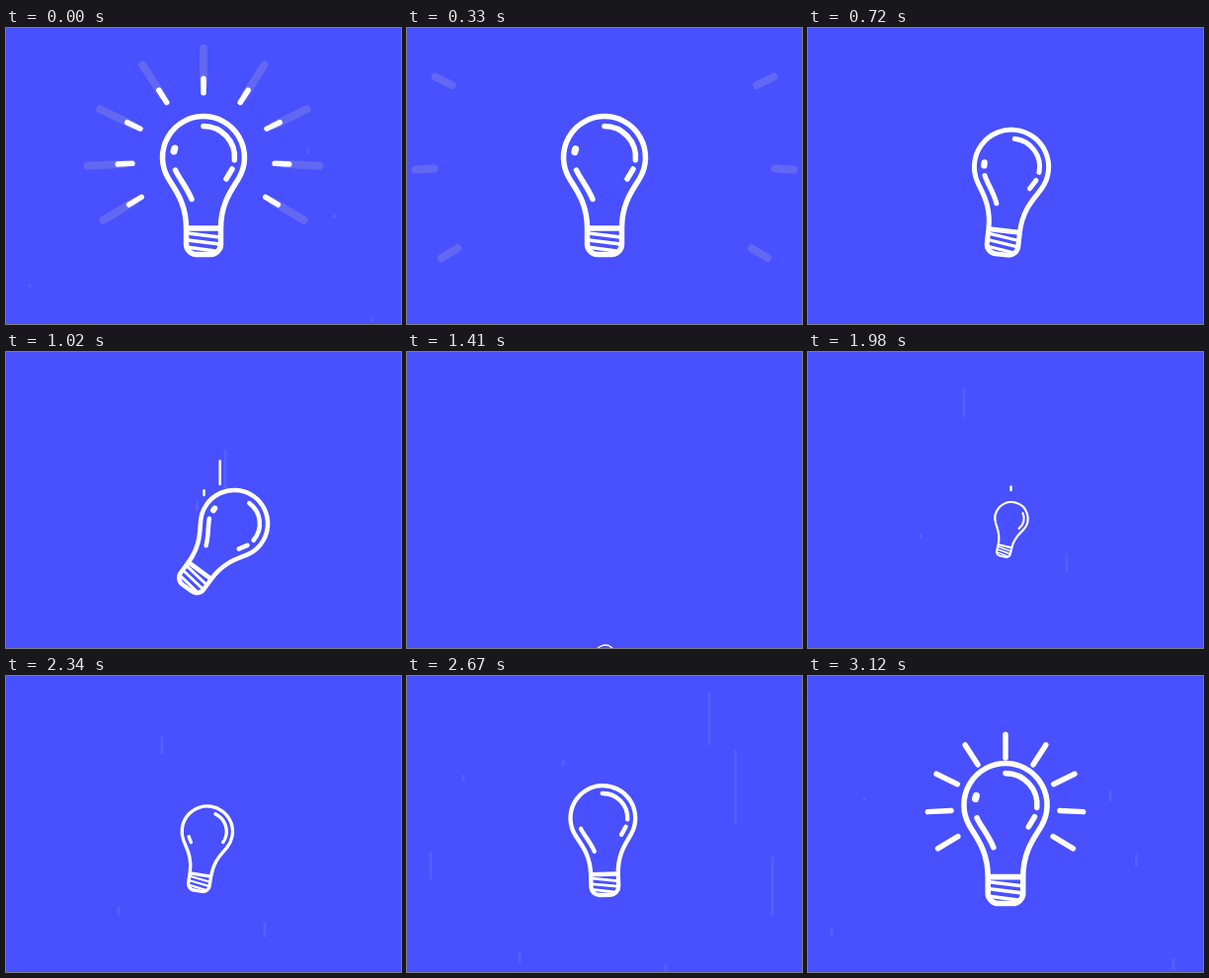
Write an HTML page that moves like this. It is 400 px wide and 300 px high and loops after 3150 ms.

```html
<!DOCTYPE html>
<html lang="en">
<head>
<meta charset="utf-8">
<title>Light bulb</title>
<style>
  html, body { margin: 0; width: 100%; height: 100%; overflow: hidden; background: #4850ff; }
  svg { display: block; width: 100vw; height: 100vh; fill: none; stroke: #fff; stroke-linecap: round; stroke-linejoin: round; }
  #glow { stroke: #6268f2; stroke-width: 8; }
  #rays, #bulb { stroke-width: 5.5; }
  #spot { stroke-width: 7; }
  .streak { stroke-width: 3; stroke-linecap: butt; stroke-opacity: .08; }
  .trail { stroke-width: 2.5; }
  .thread { stroke-width: 3.5; }
</style>
</head>
<body>
<svg viewBox="0 0 400 300">
  <g id="lines"></g>
  <g id="glow"></g>
  <g id="rays"></g>
  <g id="bulb">
    <path d="M182.5 203C182.5 176 170 162.5 164 151.75A41.5 41.5 0 1 1 236 151.75C230 162.5 217.5 176 217.5 203V219A10.5 10.5 0 0 1 207 229.5H193A10.5 10.5 0 0 1 182.5 219Z"/>
    <path d="M183 203H217"/>
    <path class="thread" d="M184 208L216 212M184 215L216 219M186 222.5L212 226"/>
    <path id="arc"/>
    <path id="dash" pathLength="1" d="M229 143L223 153"/>
    <path id="side" pathLength="1" d="M171.5 144C175 152 183 161 188 173.5"/>
    <path id="spot" pathLength="1" d="M170.8 122L170 125"/>
  </g>
</svg>
<script>
const LOOP = 3150;
const TOSS = 1380; // the bulb has dropped out and comes back from below
const $ = id => document.getElementById(id);
const ramp = (t, from, to) => Math.min(1, Math.max(0, (t - from) / (to - from)));
const mix = (a, b, p) => a + (b - a) * p;
const smooth = p => p * p * (3 - 2 * p);
const easeOut = p => 1 - (1 - p) ** 2;
const rad = deg => deg * Math.PI / 180;

function add(parent, cls = '') {
  const el = document.createElementNS('http://www.w3.org/2000/svg', 'line');
  el.setAttribute('class', cls);
  return parent.appendChild(el);
}

function setLine(el, x1, y1, x2, y2, visible) {
  el.style.display = visible ? '' : 'none';
  Object.entries({ x1, y1, x2, y2 }).forEach(([k, v]) => el.setAttribute(k, v));
}

function fallPose(t) {
  const p = Math.max(0, (t - 400) / 620);
  const lean = p ** 2.6;
  return {
    x: 200 + 17 * Math.min(lean, 1.3),
    y: 160 + 33 * p ** 2.4 + 120 * ramp(t, 1080, TOSS) ** 2,
    tilt: 36 * lean,
    scale: 1 - .00029 * Math.max(0, t - 400)
  };
}

function risePose(t) {
  return {
    x: 203.4 - 4.4 * smooth(ramp(t, 1980, 2670)) + smooth(ramp(t, 2670, 3120)),
    y: mix(380, 91, easeOut(ramp(t, TOSS, 1635)))
      + 89 * smooth(ramp(t, 1635, 1980)) - 20 * smooth(ramp(t, 1980, 3120)),
    tilt: 25 * Math.sin(Math.PI * (t - 1720) / 880) * (1 - ramp(t, TOSS, 3120)),
    scale: .24 + .16 * ramp(t, TOSS, 1980) + .615 * ramp(t, 1980, 3120) ** .9
  };
}

function drawArc(from, to) {
  const at = deg => `${200 + 31.5 * Math.cos(rad(deg))} ${131 + 31.5 * Math.sin(rad(deg))}`;
  $('arc').style.display = to - from > 1 ? '' : 'none';
  $('arc').setAttribute('d', `M${at(from)}A31.5 31.5 0 0 1 ${at(to)}`);
}

function trim(id, p) {
  $(id).style.display = p ? '' : 'none';
  $(id).style.strokeDasharray = p < 1 ? `${p} 2` : 'none';
}

function drawBulb(t) {
  const falling = t < TOSS;
  const { x, y, tilt, scale } = falling ? fallPose(t) : risePose(t);
  $('bulb').setAttribute('transform',
    `translate(${x} ${y}) rotate(${tilt}) scale(${scale}) translate(-200 -160)`);
  if (falling) drawArc(-90, 5);
  else drawArc(-90 * ramp(t, 1600, 2500), 40 * ramp(t, 1600, 1980) - 35 * ramp(t, 1980, 2500));
  trim('dash', falling ? 1 : ramp(t, 2300, 2550));
  trim('side', falling ? 1 : ramp(t, 2250, 2550));
  trim('spot', falling ? 1 : ramp(t, 2750, 2850));
  $('spot').setAttribute('transform', `rotate(${falling ? -15 * ramp(t, 300, 700) : 0} 200 131)`);
}

const rays = [90, 57.3, 26.1, -3, -31.1]
  .flatMap(a => a === 90 ? [a] : [a, 180 - a])
  .map(a => {
    const sin = Math.sin(rad(a));
    return {
      cos: Math.cos(rad(a)), sin: -sin, shift: -4.5 * sin * Math.abs(sin),
      glow: add($('glow')), ray: add($('rays'))
    };
  });

function drawRays(t) {
  const late = t < 1000 ? t + LOOP : t;
  const burst = ramp(late, 3120, 3220);
  const inner = 54.5 + 57 * burst;
  const outer = 54.5 + 24 * easeOut(ramp(late, 2850, 3120)) + 27 * burst;
  const glowInner = mix(80, 192, ramp(t, 0, 400));
  const glowOuter = mix(117, 192, easeOut(ramp(t, 0, 350)));
  for (const { cos, sin, shift, glow, ray } of rays) {
    const span = (el, from, to) => setLine(el,
      200 + cos * (from + shift), 133.5 + sin * (from + shift),
      200 + cos * (to + shift), 133.5 + sin * (to + shift), to - from > .3);
    span(ray, inner, outer);
    span(glow, glowInner, glowOuter);
  }
}

// A speed line grows from tail to head until `mid`, then both run on to `end`.
const speedLines = (cls, mid, life, rows) => rows.map(([x, tail, head, end]) =>
  ({ el: add($('lines'), cls), mid, life, x, tail, head, end }));
const lines = [
  ...speedLines('streak', 1980, 690, [[158, 36, 66, 91], [114, 184, 189, 291], [262, 204, 224, 302]]),
  ...speedLines('streak', 2670, 450, [[306, 16, 70, 127], [332.5, 75, 150, 193],
    [24, 178, 206, 263], [57, 100, 107, 126], [370, 183, 243, 298]]),
  ...speedLines('streak', 970, 80, [[222, 45, 135, 140], [193.5, 135, 158, 163]]),
  ...speedLines('trail', 970, 80, [[216.7, 73, 125, 139], [200.5, 130, 140, 148]]),
  ...speedLines('trail', 1880, 95, [[205.5, 73, 116, 140]])
];

function drawLines(t) {
  const late = t < 500 ? t + LOOP : t;
  for (const { el, mid, life, x, tail, head, end } of lines) {
    const grown = mix(tail, head, ramp(late, mid - life * .6, mid));
    const top = mix(tail, end, ramp(late, mid, mid + life * 1.12));
    const bottom = mix(grown, end, ramp(late, mid, mid + life));
    setLine(el, x, top, x, bottom, bottom - top > .1);
  }
}

const start = performance.now();
function frame() {
  const t = (performance.now() - start) % LOOP;
  drawLines(t);
  drawRays(t);
  drawBulb(t);
  requestAnimationFrame(frame);
}
frame();
</script>
</body>
</html>
```
